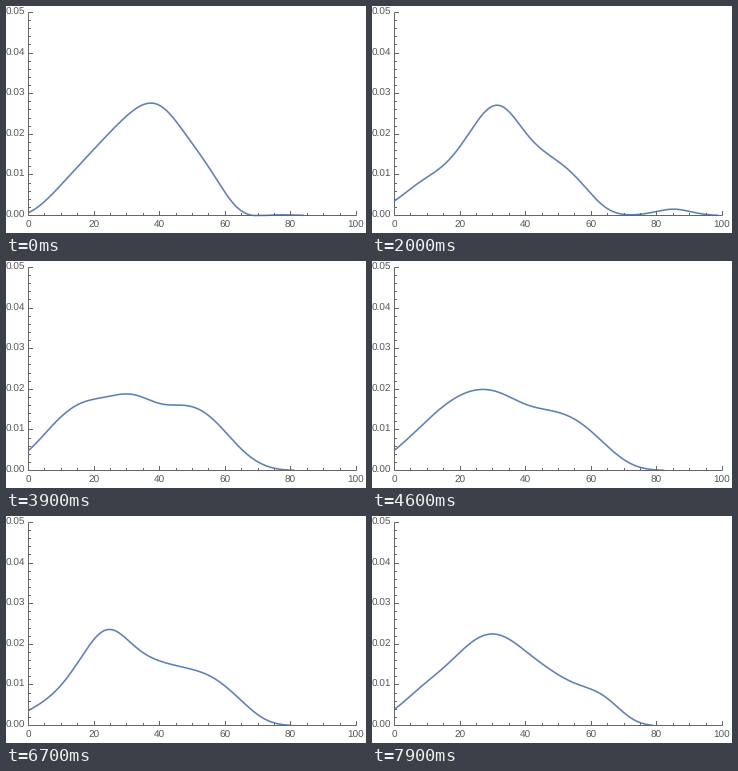
These frames come from a looping animation (360 by 227 pixels, 8 s). A matplotlib script:

```python
import numpy as np
import matplotlib.pyplot as plt
from matplotlib.animation import FuncAnimation

plt.rcParams.update({"font.family": "Liberation Sans",
                     "text.hinting": "no_hinting"})

W, H, DPI = 360, 227, 64
PX = 72 / DPI                      # one pixel in points
X0, Y0 = 22.5, 209.5               # plot origin
SX, SY = 3.28, 4.06                # pixels per unit of x and per 0.001 of density
FRAMES = 80
GREY, BLUE = "#666666", "#5e81b5"

HOLDS = {8, 12, 50, 57, 65, 66}    # frames in which the estimate stays put
CENTRES = np.arange(0, 73, 8.0)    # kernels of the estimate
WIDTH = 6.0

# frame: density in thousandths at the kernel centres
POSES = {
    0: [0.7, 5.9, 12.9, 19.8, 25.9, 27.1, 19.9, 10.6, 1.7, 0],
    20: [3.6, 8.4, 13.2, 21.8, 27.1, 20.4, 14.4, 8.9, 2.2, 0.1],
    29: [1.7, 6.4, 14.6, 22.4, 26.4, 21.2, 16.3, 10.1, 2.3, 0.1],
    39: [4.9, 11.7, 16.6, 18.2, 18.7, 16.5, 16, 12.8, 6, 1.3],
    54: [5.1, 10, 16.4, 21.2, 19.7, 16.1, 13.4, 11.4, 7.3, 2.1],
    67: [3.7, 8.3, 16.7, 23.6, 19.8, 15.9, 14.2, 11.9, 6.8, 1.6],
    79: [4, 9.5, 15, 20.8, 22.3, 18.3, 13.5, 10.1, 7.2, 1.9],
}


def kernel(x, centre, width):
    return np.exp(-0.5 * ((x - centre) / width) ** 2)


def basis(x):
    return kernel(x[:, None], CENTRES, WIDTH)


xs = np.linspace(0, 100, 401)
# kernel weights that pass through the given values, one row per pose
weights = np.linalg.solve(basis(CENTRES), np.array(list(POSES.values())).T).T
steps = np.cumsum([f > 0 and f not in HOLDS for f in range(FRAMES)])
pose_steps = steps[list(POSES)]


def density(frame):
    s = steps[frame]
    body = basis(xs) @ [np.interp(s, pose_steps, w) for w in weights.T]
    # the peak swells on the way to the second pose
    swell = np.interp(frame, [0, 10, 20], [0, 4, 0])
    # a stray value enters at the right, drifts inwards and fades
    stray = np.interp(frame, [8, 11, 29, 38], [0, 1.6, 1.5, 0])
    place = np.interp(frame, [20, 29], [85, 73])
    total = body + swell * kernel(xs, 32, 6) + stray * kernel(xs, place, 5.3)
    return np.clip(total, 0, None)


fig = plt.figure(figsize=(W / DPI, H / DPI), dpi=DPI, facecolor="white")
ax = fig.add_axes([0, 0, 1, 1])
ax.set(xlim=(0, W), ylim=(H, 0))
ax.axis("off")


def rule(x, y):
    ax.plot(x, y, color=GREY, lw=PX, solid_capstyle="butt", snap=False,
            zorder=3)


def label(x, y, text, ha):
    ax.text(x, y, text, ha=ha, va="center_baseline", color="#555555",
            size=10 * PX)


def crisp(v):
    """Middle of the pixel that holds v."""
    return np.floor(v) + 0.5


rule([X0, X0 + 100 * SX], [Y0, Y0])
rule([X0, X0], [Y0, Y0 - 50 * SY])
for v in range(0, 101, 5):
    x, major = crisp(X0 + v * SX), v % 20 == 0
    rule([x, x], [Y0, Y0 - (4.5 if major else 2.5)])
    if major:
        label(x - 0.5, 218, str(v), "center")
for v in range(0, 51, 2):
    y, major = crisp(Y0 - v * SY), v % 10 == 0
    rule([X0, X0 + (4.5 if major else 2.5)], [y, y])
    if major:
        label(19.5, y - 0.8, f"{v / 1000:.2f}", "right")

curve, = ax.plot([], [], color=BLUE, lw=1.6 * PX, solid_capstyle="butt",
                 solid_joinstyle="round", zorder=2)


def update(frame):
    d = density(frame)
    end = np.flatnonzero(d > 0.05)[-1] + 1
    curve.set_data(X0 + xs[:end] * SX, Y0 - d[:end] * SY)
    return curve,


anim = FuncAnimation(fig, update, frames=FRAMES, interval=100,
                     repeat=True, repeat_delay=0)
plt.show()
```
